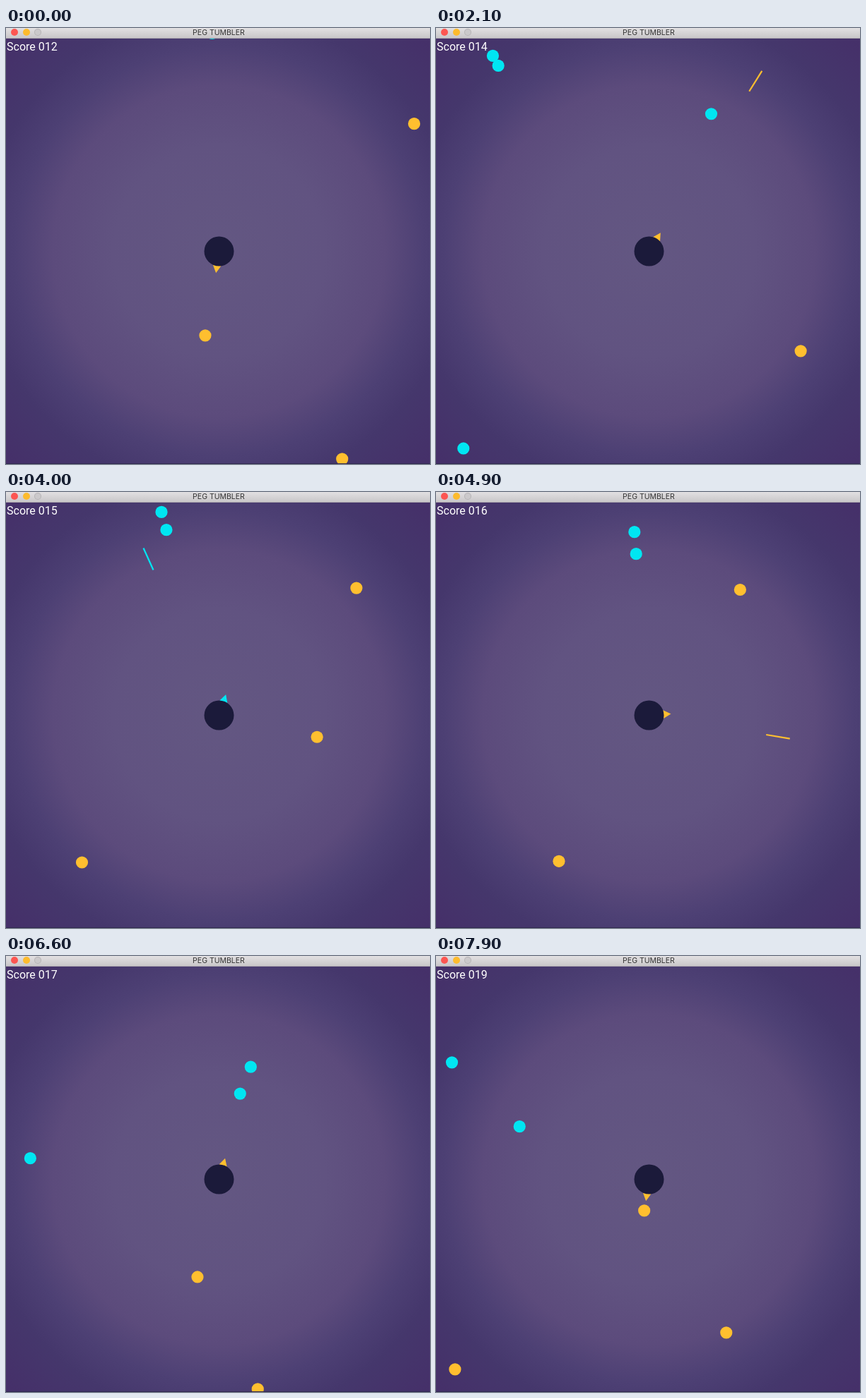
An HTML page with a canvas that plays this animation: 600 px wide and 618 px high, repeating every 8 s.

```html
<!DOCTYPE html>
<html lang="en">
<head>
<meta charset="utf-8">
<title>PEG TUMBLER</title>
<style>
html, body { margin: 0; width: 100%; height: 100%; overflow: hidden; }
#stage {
  position: relative; width: 600px; height: 618px; overflow: hidden;
  background: radial-gradient(circle at 301.5px 316.5px,
    #635782, #615381 150px, #5c4b7c 235px, #4d4074 290px, #45376c 340px, #452f69 430px);
}
#stage::after {
  content: ""; position: absolute; left: 0; right: 0; bottom: 0;
  height: 1px; background: #30284f;
}
canvas { position: absolute; left: 0; top: 0; }
#score {
  position: absolute; left: 1px; top: 17px; color: #fff;
  font: 16px/20px Roboto, sans-serif; white-space: pre;
}
#bar {
  position: absolute; left: 0; top: 0; width: 602px; height: 14px;
  background: linear-gradient(#e2e0e2, #c9c7c9);
  border-bottom: 1px solid #aaa5ae;
  font: 10.5px/13px Inter, sans-serif; color: #333; text-align: center;
}
#lights { position: absolute; left: 7px; top: 1px; display: flex; gap: 6.6px; }
#lights i { width: 10px; height: 10px; border-radius: 50%; background: #fc5652; }
#lights i:nth-child(2) { background: #fdbb2d; }
#lights i:nth-child(3) { background: #cbc9cb; box-shadow: inset 0 0 0 1px #b8b6b8; }
</style>
</head>
<body>
<div id="stage">
  <canvas id="game" width="600" height="618"></canvas>
  <div id="score"></div>
  <div id="bar"><div id="lights"><i></i><i></i><i></i></div>PEG TUMBLER</div>
</div>
<script>
const CX = 301.5, CY = 316.5, DEG = Math.PI / 180, LOOP = 8;
const ORANGE = '#ffbf2f', CYAN = '#00e6f2';
const DOT = 8.6, MUZZLE = 30, SHOT_SPEED = 600, SHOT_HALF = 17, TURN = 0.9;
const ctx = document.getElementById('game').getContext('2d');
const scoreBox = document.getElementById('score');

// Start time in seconds, start radius and angle in degrees, time of the hit.
const dot = (color, start, radius, angle, hit = Infinity) =>
  ({ color, start, radius, angle, hit });

const dots = [
  dot(ORANGE, -7.1, 373, 181, 0.2),
  dot(ORANGE, -3, 375, 0.9, 2),
  dot(ORANGE, -3, 387, 93.5, 4.7),
  dot(ORANGE, -0.6, 371, 11, 6.15),
  dot(ORANGE, -0.2, 373, 181.8),
  dot(ORANGE, 2.7, 378.5, 124.7),
  dot(ORANGE, 6.87, 390, 146.8),
  dot(CYAN, -3.5, 370.5, -132, 2.72),
  dot(CYAN, -0.4, 370, 202.8, 6.83),
  dot(CYAN, 0.15, 373.5, 209.7, 7),
  dot(CYAN, 1.8, 384, 130),
  dot(CYAN, 4.72, 375, 174.4)
];

// Dots fall inwards at a steady acceleration and swirl by colour;
// the swirl dies away close to the centre.
function orbit({ color, start, radius, angle }, t) {
  const age = t - start;
  const swirl = 10.7 * age + 0.225 * age ** 2 - 4.94 * (age / 7) ** 9;
  return {
    r: radius - 5 * age ** 2,
    angle: angle + (color === CYAN ? swirl : -swirl)
  };
}

// Every hit comes from a shot aimed at where its dot will be.
function shotAt(target) {
  const { r, angle } = orbit(target, target.hit);
  const flight = (r - DOT - SHOT_HALF - MUZZLE) / SHOT_SPEED;
  const turns = Math.round(angle / 360);
  return { color: target.color, fired: target.hit - flight, angle: angle - 360 * turns };
}

const misses = [
  { color: CYAN, fired: 3.645, angle: -114.3 },
  { color: ORANGE, fired: 5.668, angle: -57.2 }
];
const shots = dots.filter(d => d.hit < LOOP).map(shotAt).concat(misses)
  .sort((a, b) => a.fired - b.fired);

function polar(r, deg) {
  return [CX + r * Math.cos(deg * DEG), CY + r * Math.sin(deg * DEG)];
}

function disc([x, y], r, color) {
  ctx.fillStyle = color;
  ctx.beginPath();
  ctx.arc(x, y, r, 0, 2 * Math.PI);
  ctx.fill();
}

function drawDot(d, t) {
  if (t < d.start || t >= d.hit) return;
  const { r, angle } = orbit(d, t);
  disc(polar(r, angle), DOT, d.color);
}

function drawShot({ color, fired, angle }, t) {
  if (t < fired) return;
  const r = MUZZLE + SHOT_SPEED * (t - fired);
  ctx.strokeStyle = color;
  ctx.lineWidth = 2.2;
  ctx.beginPath();
  ctx.moveTo(...polar(r - SHOT_HALF, angle));
  ctx.lineTo(...polar(r + SHOT_HALF, angle));
  ctx.stroke();
}

// After each shot the turret swings to the next aim, then takes its colour.
function drawTurret(t) {
  const n = shots.length;
  const i = shots.filter(s => s.fired <= t).length;
  const last = shots[(i + n - 1) % n], next = shots[i % n];
  const since = (t - last.fired + LOOP) % LOOP;
  const gap = (next.fired - last.fired + LOOP) % LOOP;
  const k = Math.min(1, since / Math.min(TURN, gap));
  const angle = last.angle + (next.angle - last.angle) * k * k * (3 - 2 * k);
  ctx.fillStyle = k < 1 ? last.color : next.color;
  ctx.beginPath();
  ctx.moveTo(...polar(31, angle));
  ctx.lineTo(...polar(21, angle - 16));
  ctx.lineTo(...polar(21, angle + 16));
  ctx.fill();
  disc([CX, CY], 21, '#1b1a3a');
}

function draw(now) {
  const t = Math.floor(now / 100) % (LOOP * 10) / 10;
  ctx.clearRect(0, 0, 600, 618);
  shots.forEach(s => drawShot(s, t));
  dots.forEach(d => drawDot(d, t));
  drawTurret(t);
  scoreBox.textContent = 'Score 0' + (12 + dots.filter(d => d.hit <= t).length);
  requestAnimationFrame(draw);
}
draw(performance.now());
</script>
</body>
</html>
```
